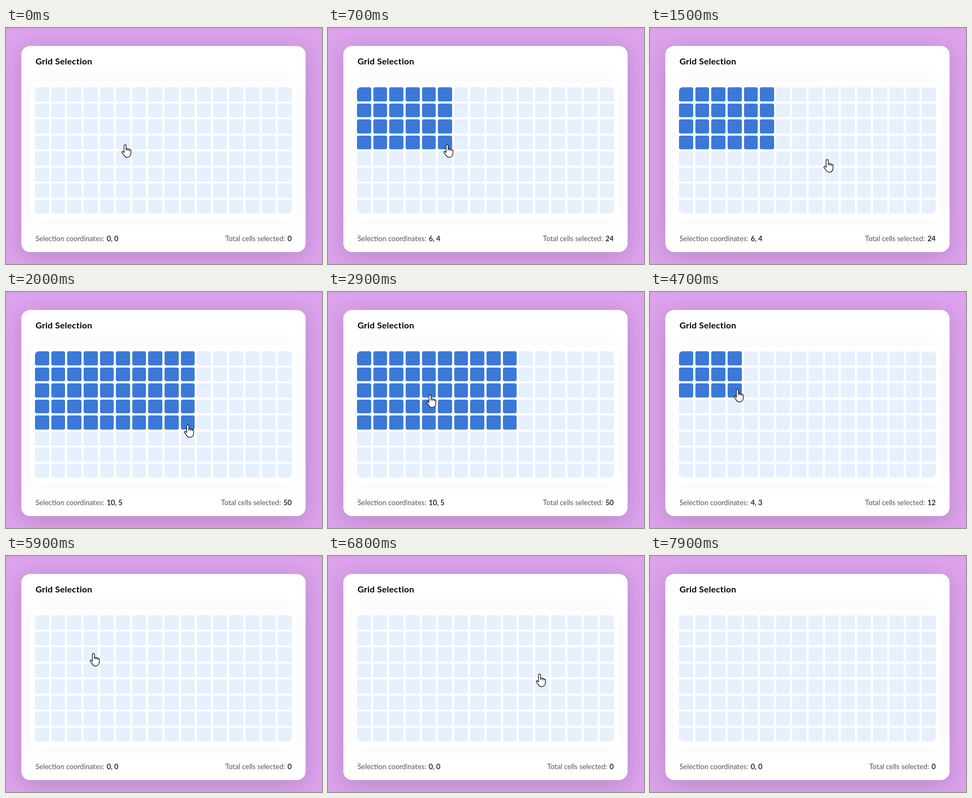
Animation, 578 px wide and 434 px high, one loop 8 s. Source, as an HTML page:

```html
<!DOCTYPE html>
<html lang="en">
<head>
<meta charset="utf-8">
<title>Grid Selection</title>
<style>
  html, body { margin: 0; width: 100%; height: 100%; overflow: hidden; }
  body { position: relative; background: #dca2ec; font: 13px/16px Lato, "Open Sans", sans-serif; }
  body > * { position: absolute; }
  .card {
    left: 28px; top: 33px; width: 520px; height: 379px; border-radius: 16px;
    background: #fff; box-shadow: 0 8px 40px rgba(0, 0, 0, .16); overflow: hidden;
  }
  .panel {
    left: 43px; top: 99px; width: 489px; height: 252px; border-radius: 10px;
    background: #fff; box-shadow: 0 0 40px rgba(0, 0, 0, .045);
  }
  h1 { left: 54px; top: 51px; margin: 0; font-size: 16px; line-height: 20px; letter-spacing: .25px; color: #000; }
  #grid {
    left: 53.3px; top: 109px; width: 469.6px; height: 232px; border-radius: 7px; overflow: hidden;
    display: grid; grid-template: repeat(8, 1fr) / repeat(16, 1fr); gap: 4px;
  }
  #grid i { border-radius: 3px; background: #e6f0fe; }
  #grid i.on { background: #3b79d9; }
  p { top: 379px; margin: 0; display: flex; gap: 4.5px; color: #555; white-space: pre; }
  p b { font-weight: 500; color: #000; }
  #hand { left: 0; top: 0; width: 19px; height: 26px; overflow: visible; }
</style>
</head>
<body>
<div class="card"></div>
<div class="panel"></div>
<h1>Grid Selection</h1>
<div id="grid"></div>
<p style="left:54px">Selection coordinates:<b id="coords"></b></p>
<p style="right:55.5px">Total cells selected:<b id="total"></b></p>
<svg id="hand" viewBox="0 0 19 26">
  <path fill="#fff" stroke="#111" stroke-width="1.2" stroke-linejoin="round"
    d="M5 15.5V3a1.9 1.9 0 0 1 3.8 0v8.5V9.6a1.6 1.6 0 0 1 3.1 0v2.2V10.3a1.5 1.5 0 0 1 3 0v2v-1a1.4 1.4 0 0 1 2.7 0V17c0 4-2.5 7.3-6.8 7.3c-3.6 0-5-1.8-6.3-4.2L1.2 15.8c-1-2 1.2-3.2 2.4-1.8z"/>
</svg>
<script>
  const LOOP = 8000, COLS = 16, ROWS = 8, HIDE_AT = 6900;
  const $ = id => document.getElementById(id);

  // [time, columns, rows]
  const clicks = [[0, 0, 0], [500, 6, 4], [1700, 10, 5], [4500, 4, 3], [5300, 0, 0]];
  // [start, end, x, y]
  const moves = [
    [0, 0, 211, 213.5],
    [1000, 1600, 325.5, 243],
    [2300, 3100, 153, 178],
    [6300, 6800, 380, 216]
  ];

  const cells = Array.from({ length: COLS * ROWS }, () =>
    $("grid").appendChild(document.createElement("i")));

  const ease = p => p * p * (3 - 2 * p);

  function handAt(t) {
    let [, , x, y] = moves[0];
    for (const [start, end, toX, toY] of moves.slice(1)) {
      const p = ease(Math.min(1, Math.max(0, (t - start) / (end - start))));
      x += (toX - x) * p;
      y += (toY - y) * p;
    }
    return [x, y];
  }

  let shown;
  function select(click) {
    if (click === shown) return;
    shown = click;
    const [, cols, rows] = click;
    cells.forEach((cell, i) =>
      cell.classList.toggle("on", i % COLS < cols && Math.floor(i / COLS) < rows));
    $("coords").textContent = `${cols}, ${rows}`;
    $("total").textContent = cols * rows;
  }

  function draw(t) {
    select(clicks.filter(c => c[0] <= t).pop());
    const [x, y] = handAt(t);
    $("hand").style.transform = `translate(${x}px, ${y}px)`;
    $("hand").style.visibility = t < HIDE_AT ? "visible" : "hidden";
  }

  function tick() {
    draw(performance.now() % LOOP);
    requestAnimationFrame(tick);
  }
  tick();
</script>
</body>
</html>
```
